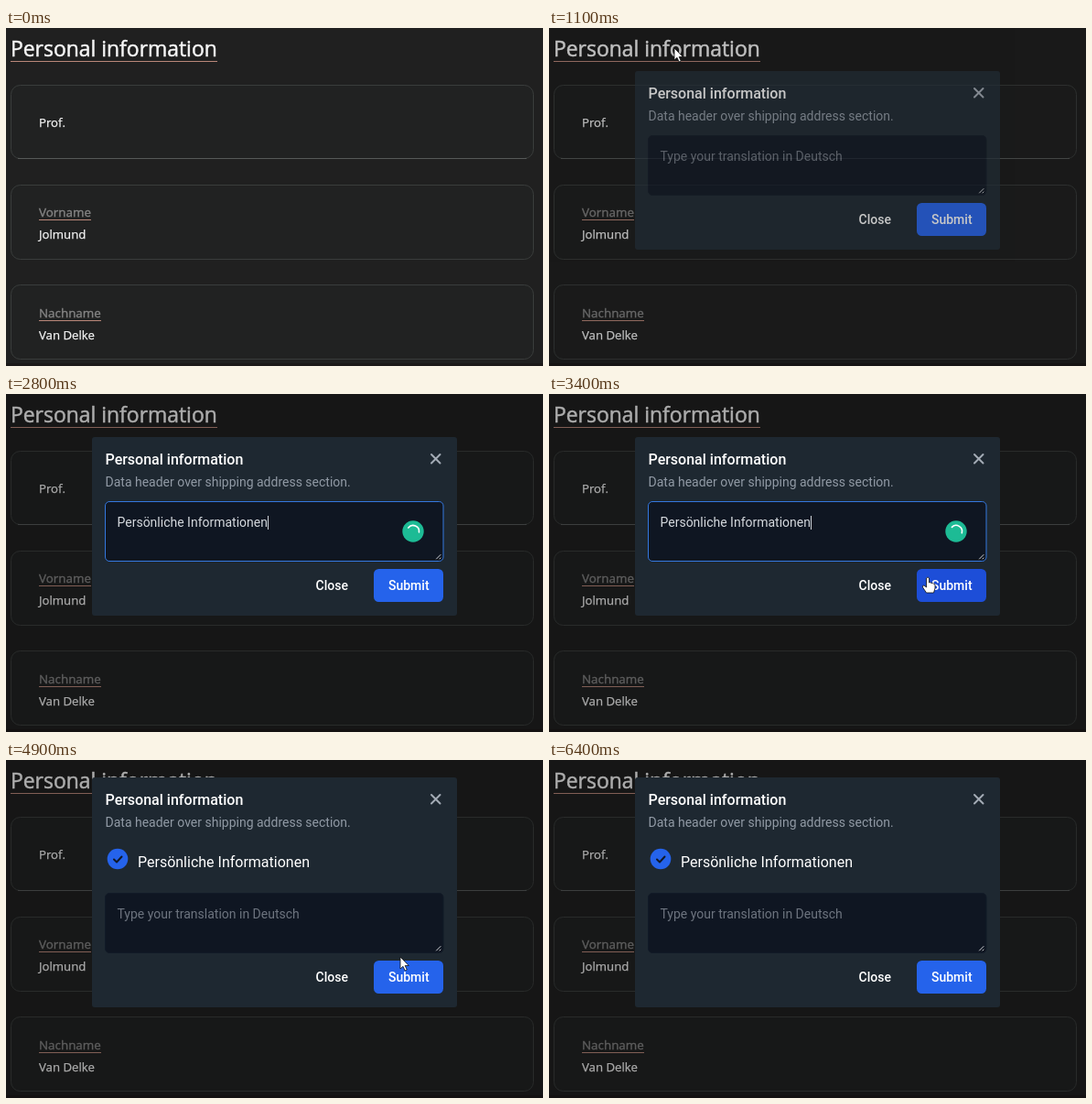
Write an HTML page that moves like this. It is 587 px wide and 369 px high and loops after 7000 ms.

```html
<!DOCTYPE html>
<html lang="en">
<head>
<meta charset="utf-8">
<title>Translation dialog</title>
<style>
  html, body { margin: 0; width: 100%; height: 100%; overflow: hidden; background: #202020; }
  svg { display: block; width: 587px; height: 369px; }
  .page { font: 13.2px "Open Sans", sans-serif; }
  .page text { fill: #f6f6f6; stroke: #f6f6f6; stroke-width: .25; }
  .page .title { font-size: 22.9px; stroke-width: .5; }
  .page .label { font-size: 13.4px; fill: #858585; stroke: #858585; stroke-width: .35; }
  .card { fill: #212222; stroke: #3a3d3c; }
  .underline { stroke: #b98779; }
  .dialog { font: 14px Roboto, sans-serif; fill: #fff; }
  .medium { font-weight: 500; }
  .large { font-size: 16px; }
  .muted { fill: #919aa5; }
  .placeholder { fill: #6d747f; }
  .line { fill: none; stroke-linecap: round; stroke-linejoin: round; }
  .pointer { fill: #fff; stroke: #111; stroke-width: .8; stroke-linejoin: round; }
</style>
</head>
<body>
<svg viewBox="0 0 587 369">
  <rect width="587" height="369" fill="#202020"/>
  <rect y="366" width="587" height="3" fill="#1b1818"/>
  <g class="page">
    <text class="title" x="5" y="30.500">Personal information</text>
    <path class="underline" d="M5 36.500H231"/>
    <rect class="card" x="5.500" y="62.500" width="571" height="80" rx="10"/>
    <path d="M13 142.500H569" stroke="#565958"/>
    <rect class="card" x="5.500" y="171.500" width="571" height="81" rx="10"/>
    <rect class="card" x="5.500" y="280.500" width="571" height="81" rx="10"/>
    <text x="36" y="107.500">Prof.</text>
    <text class="label" x="36" y="206">Vorname</text>
    <path class="underline" d="M36 209.500H93"/>
    <text x="36" y="230">Jolmund</text>
    <text class="label" x="36" y="315.500">Nachname</text>
    <path class="underline" d="M36 319.500H104"/>
    <text x="36" y="340">Van Delke</text>
  </g>

  <g id="modal">
    <rect width="587" height="369" fill="#000" fill-opacity=".3"/>
    <g class="dialog">
      <rect id="panel" x="94" width="399" rx="3" fill="#1e2831"/>
      <g id="header">
        <text class="medium large" x="108.500" y="77">Personal information</text>
        <text class="muted" x="108.500" y="101">Data header over shipping address section.</text>
        <path class="line" d="M465 66l9.500 9.500m0-9.500l-9.500 9.500" stroke="#a3abb5" stroke-width="2"/>
      </g>
      <g id="answer">
        <circle cx="122" cy="108" r="11.300" fill="#2563eb"/>
        <path class="line" d="M118 108.500l3 3 5.500-6" stroke="#111827" stroke-width="2"/>
        <text class="large" x="144" y="116.500">Persönliche Informationen</text>
      </g>
      <g id="form">
        <rect id="field" x="108.500" y="117.500" width="369.500" height="65" rx="4.500" fill="#0f1622"/>
        <text id="entry" x="121.500" y="145"></text>
        <rect id="caret" y="133" width="1" height="15" fill="#cfd4da"/>
        <path class="line" d="M470.500 180l4.500-4.500M474 180l1-1" stroke="#cfd2d6"/>
        <g id="spinner">
          <circle cx="445" cy="150" r="11.700" fill="#1dbb95"/>
          <path id="arc" class="line" d="M451.300 151.700A6.500 6.500 0 0 0 440.400 145.400" stroke="#fff" stroke-width="1.600"/>
        </g>
        <text class="medium" x="338.500" y="214">Close</text>
        <rect id="submit" x="402" y="191" width="76" height="36" rx="5.500"/>
        <text class="medium" x="418" y="214">Submit</text>
      </g>
    </g>
  </g>

  <g id="cursor">
    <g id="arrow">
      <path class="pointer" d="M0 0V13L3 10.300 5.200 15 7.300 14 5.200 9.500H9.300Z"/>
      <text id="help" x="10" y="15" font-family="Roboto, sans-serif" font-size="10" font-weight="700" fill="#fff">?</text>
    </g>
    <path id="hand" class="pointer" d="M-1.500 1Q0-1 1.500 1V6Q3 5 4 6.500 5.500 5.700 6.300 7.200 8 6.800 8 9V12L6.500 17H-1.500L-5.500 11Q-6 8.500-4 9L-1.500 11Z"/>
  </g>
</svg>

<script>
const LOOP = 7000, STEP = 100;
const OPEN = 800, FOCUS = 2400, PASTE = 2600, CHECKING = 2800, SUBMIT = 4400, SAVED = 4900;

// time, x, y of the mouse
const mousePath = [
  [200, 205, 335], [600, 137, 22], [1600, 137, 22], [1900, 160, 150],
  [2800, 300, 150], [3400, 414, 200], [3700, 436, 214], [4800, 436, 214],
  [4900, 431, 215], [5400, 431, 215], [6100, 440, 318], [6300, 446, 372]
];

const el = {};
document.querySelectorAll("[id]").forEach(node => el[node.id] = node);

const set = (node, attributes) => {
  for (const name in attributes) node.setAttribute(name, attributes[name]);
};
const show = (node, visible) => set(node, { display: visible ? "inline" : "none" });
const shift = (node, y) => set(node, { transform: `translate(0 ${y})` });
const inside = (x, y, left, top, right, bottom) =>
  x >= left && x <= right && y >= top && y <= bottom;

function mouseAt(t) {
  const next = mousePath.findIndex(point => point[0] > t);
  if (next < 1) return mousePath[next < 0 ? mousePath.length - 1 : 0].slice(1);
  const [t0, x0, y0] = mousePath[next - 1], [t1, x1, y1] = mousePath[next];
  const p = (t - t0) / (t1 - t0), eased = p * p * (3 - 2 * p);
  return [x0 + (x1 - x0) * eased, y0 + (y1 - y0) * eased];
}

function drawMouse(t, offset) {
  const [x, y] = mouseAt(t), open = t > OPEN;
  const overField = open && inside(x, y, 108, 117 + offset, 478, 183 + offset);
  const overSubmit = open && inside(x, y, 402, 191 + offset, 478, 227 + offset);
  set(el.cursor, { transform: `translate(${x} ${y})` });
  show(el.cursor, t >= 200 && t < 6400 && !overField);
  show(el.arrow, !overSubmit);
  show(el.hand, overSubmit);
  show(el.help, !open && inside(x, y, 5, 8, 231, 37));
  set(el.submit, { fill: overSubmit ? "#1d4ed8" : "#2563eb" });
}

function draw(t) {
  const saved = t >= SAVED, offset = saved ? 28 : 0;
  const focused = t >= FOCUS && t < SUBMIT;
  const filled = t >= PASTE && !saved;

  set(el.modal, { opacity: Math.min(1, Math.max(0, (t - OPEN) / 400)) });
  set(el.panel, { y: 47 - offset, height: 195 + 2 * offset });
  shift(el.header, -offset);
  shift(el.form, offset);
  show(el.answer, saved);

  set(el.field, { stroke: focused ? "#3478df" : "#111a27" });
  el.entry.textContent = filled ? "Persönliche Informationen" : "Type your translation in Deutsch";
  set(el.entry, { class: filled ? "" : "placeholder", fill: "#d5d9de" });
  show(el.caret, focused);
  set(el.caret, { x: filled ? 286 : 121 });
  show(el.spinner, t >= CHECKING && t < SUBMIT);
  set(el.arc, { transform: `rotate(${(t - 3400) * 0.6125} 445 150)` });

  drawMouse(t, offset);
}

const start = performance.now();
function tick() {
  const t = (performance.now() - start) % LOOP;
  draw(Math.floor(t / STEP) * STEP);
  requestAnimationFrame(tick);
}
tick();
</script>
</body>
</html>
```
